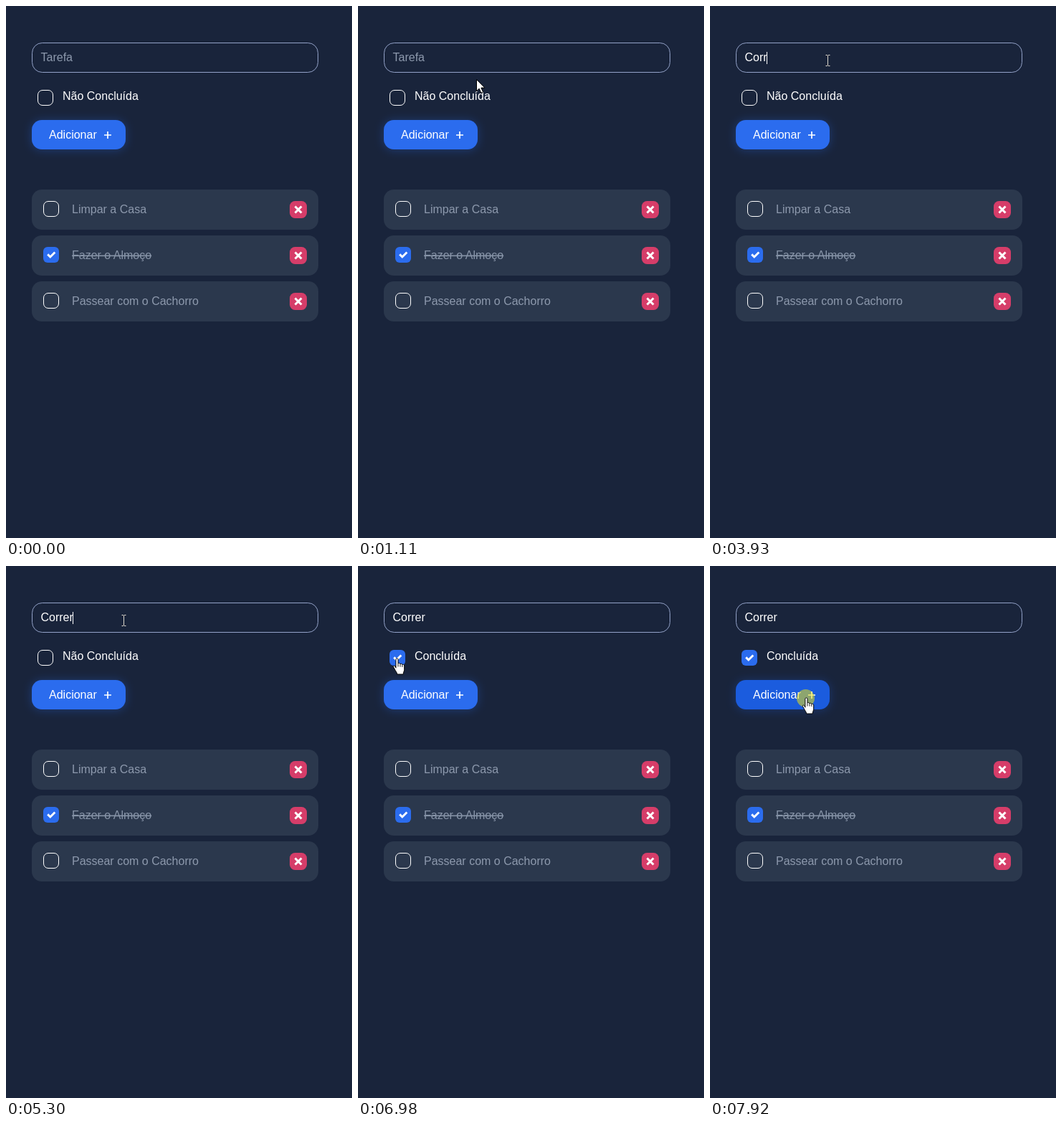
An HTML page for the animation above (8000 ms loop, 483 px wide and 742 px high).

```html
<!DOCTYPE html>
<html lang="pt">
<head>
<meta charset="utf-8">
<title>Lista de tarefas</title>
<style>
  html, body { margin: 0; width: 100%; height: 100%; overflow: hidden; background: #19243b; }
  svg { display: block; width: 100%; height: 100%; }
  text { font: 16px "Liberation Sans", Arial, sans-serif; fill: #fff; white-space: pre; }
  .dim { fill: #8d99ad; }
  .done { fill: #8794a8; text-decoration: line-through; }
  .card { fill: #2b384d; }
  .line { fill: none; stroke: #fff; }
  #glow { filter: blur(7px); opacity: .33; }
</style>
</head>
<body>
<svg viewBox="0 0 483 742" xmlns="http://www.w3.org/2000/svg">
  <defs>
    <g id="empty"><rect class="line" x=".5" y=".5" width="21" height="21" rx="6.5"/></g>
    <g id="checked">
      <rect width="22" height="22" rx="6" fill="#2b6cee"/>
      <path class="line" d="M6.2 10.4l3.6 3.6 6.5-6.6" stroke-width="2.9"/>
    </g>
    <g id="remove">
      <rect width="24" height="24" rx="7.5" fill="#d63d69"/>
      <path class="line" d="M7.5 7.5l9 9m0-9l-9 9" stroke-width="3"/>
    </g>
  </defs>

  <rect width="483" height="742" fill="#19243b"/>
  <rect x="36.5" y="51.5" width="399" height="41" rx="14" fill="none" stroke="#93a2c8"/>
  <text id="field" x="48.5" y="77"></text>
  <rect id="caret" y="64" width="1" height="17" fill="#fff"/>

  <use id="toggle" x="44" y="117"/>
  <text id="state" x="79" y="131"></text>

  <rect id="glow" x="36" y="160" width="131" height="41" rx="14"/>
  <rect id="button" x="36" y="159" width="131" height="41" rx="14"/>
  <text x="60" y="185">Adicionar</text>
  <path class="line" d="M137 180h10m-5-5v10" stroke-width="1.7"/>

  <g id="list"></g>

  <circle id="press" r="12.5" fill="#ebe114" fill-opacity=".55"/>
  <path id="arrow" d="M.5.5v16.2l3.7-3.5 2.7 6.1 2.7-1.2-2.7-6h5z" fill="#fff" stroke="#000"/>
  <path id="beam" d="M-2.5 -7.5h2.5m1 0h2.5M-2.5 7.5h2.5m1 0h2.5M.5 -7v14" fill="none" stroke="#ded9cd"/>
  <g id="hand">
    <path d="M-1.1 13.2V1.2C-1.1-.6 2-.6 2 1.2V7.3C2.3 6 5 6.2 5 7.9 5.5 6.8 7.9 7.1 7.9 8.8 8.5 7.9 10.7 8.3 10.7 10V15.2C10.7 17.7 9.3 18.6 9.2 22H.7C.6 19.6-1.7 17.3-2.9 14.7L-4.6 11.6C-5.1 10-3.3 9.4-2.4 10.7Z"
      fill="#fff" stroke="#000"/>
    <path d="M2 7.5v4m3-3.5v3.7m2.9-2.9v3.2" fill="none" stroke="#000" stroke-width=".9"/>
  </g>
</svg>
<script>
const LOOP = 8000, BLINK = 530;
const $ = id => document.getElementById(id);
const clamp = v => Math.min(1, Math.max(0, v));
const lerp = (a, b, k) => a + (b - a) * k;
const ease = k => k * k * (3 - 2 * k);
const show = (id, on) => $(id).setAttribute('visibility', on ? 'visible' : 'hidden');

// where the pointer rests, and when
const STOPS = [
  { from: 200, to: 200, x: 425, y: 732 },
  { from: 490, to: 770, x: 357, y: 477 },
  { from: 1110, to: 1140, x: 165, y: 102 },
  { from: 1470, to: 1970, x: 164, y: 80 },
  { from: 2140, to: 5850, x: 164, y: 76 },
  { from: 6170, to: 6290, x: 28, y: 118 },
  { from: 6580, to: 7110, x: 54, y: 129 },
  { from: 7760, to: 7790, x: 138, y: 187 },
  { from: 7880, to: LOOP, x: 134, y: 184 }
];
const FOCUS = 2140, CHECK = 6780, RELEASE = 6980, SUBMIT = 7900, HOVER = 7440;
const PRESSES = [[FOCUS, 2260], [CHECK, RELEASE], [SUBMIT, LOOP]];
const KEYS = [3180, 3540, 3710, 3930, 4100, 4220];

const TASKS = [['Limpar a Casa'], ['Fazer o Almoço', true], ['Passear com o Cachorro']];
$('list').innerHTML = TASKS.map(([name, done], i) => `
  <g transform="translate(36 ${256 + 64 * i})">
    <rect class="card" width="400" height="56" rx="14"/>
    <use href="#${done ? 'checked' : 'empty'}" x="16" y="16"/>
    <text class="${done ? 'done' : 'dim'}" x="56" y="33">${name}</text>
    <use href="#remove" x="360" y="16"/>
  </g>`).join('');

function pointerAt(t) {
  const i = STOPS.findLastIndex(s => t >= s.from);
  if (i < 0) return null;
  const a = STOPS[i], b = STOPS[i + 1] || a;
  const k = ease(clamp((t - a.to) / (b.from - a.to || 1)));
  return [Math.round(lerp(a.x, b.x, k)), Math.round(lerp(a.y, b.y, k))];
}

function shapeAt(x, y) {
  const inside = (left, top, right, bottom) => x >= left && x <= right && y >= top && y <= bottom;
  if (inside(36, 51, 436, 93)) return 'beam';
  if (inside(44, 117, 66, 139) || inside(36, 159, 167, 200)) return 'hand';
  return 'arrow';
}

function drawPointer(t) {
  const pos = pointerAt(t);
  const shape = pos && shapeAt(...pos);
  for (const id of ['arrow', 'beam', 'hand']) show(id, id === shape);
  show('press', PRESSES.some(([a, b]) => t >= a && t < b));
  if (!pos) return;
  const [x, y] = pos;
  $(shape).setAttribute('transform', `translate(${x} ${y})`);
  $('press').setAttribute('transform', `translate(${x - .5} ${y + .5})`);
}

function drawField(t) {
  const typed = 'Correr'.slice(0, KEYS.filter(k => t >= k).length);
  const field = $('field');
  field.textContent = typed || 'Tarefa';
  field.setAttribute('class', typed ? '' : 'dim');

  // every key restarts the blink
  const since = t - [FOCUS, ...KEYS].findLast(k => t >= k);
  const width = typed ? field.getComputedTextLength() : 0;
  $('caret').setAttribute('x', Math.floor(48.3 + width));
  show('caret', t < CHECK && Math.floor(since / BLINK) % 2 === 0);
}

function drawForm(t) {
  const done = t >= RELEASE;
  $('toggle').setAttribute('href', done ? '#checked' : '#empty');
  $('state').textContent = done ? 'Concluída' : 'Não Concluída';
  const shade = 16 * clamp((t - HOVER) / 200);
  const fill = `rgb(${[43, 108, 238].map(c => Math.round(c - shade))})`;
  $('button').setAttribute('fill', fill);
  $('glow').setAttribute('fill', fill);
}

const start = performance.now();
function tick() {
  const t = (performance.now() - start) % LOOP;
  drawField(t);
  drawForm(t);
  drawPointer(t);
  requestAnimationFrame(tick);
}
tick();
</script>
</body>
</html>
```
